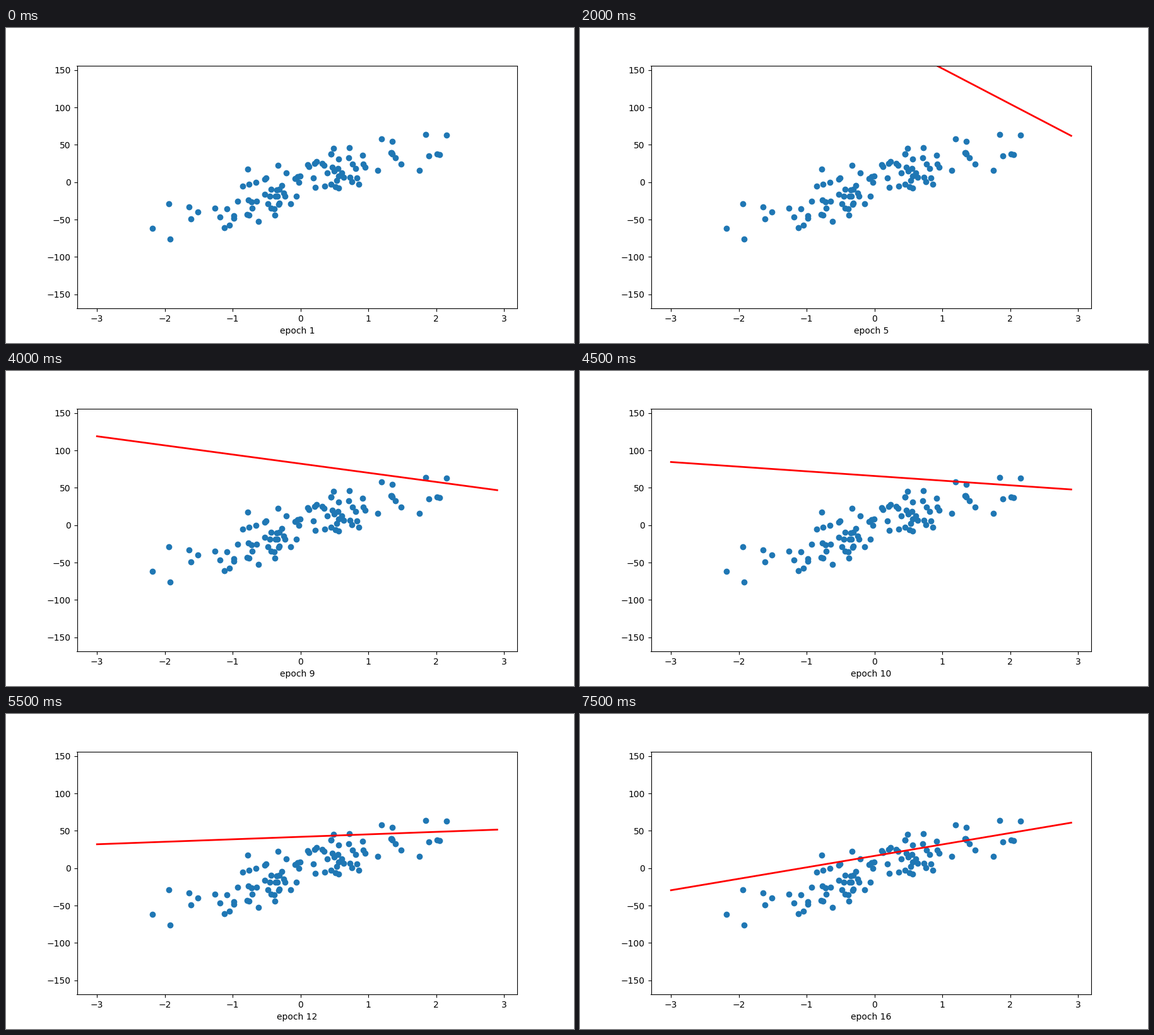
These frames come from a looping animation (900x500 px, 8000 ms). A matplotlib script:

```python
import numpy as np
import matplotlib.pyplot as plt
from matplotlib.animation import FuncAnimation

EPOCHS = 16
RATE = 0.001


def make_data(n=100, noise=20, seed=13):
    rng = np.random.RandomState(seed)
    x = rng.standard_normal(size=(n, 1))[:, 0]
    slope = 100 * rng.uniform()
    return x, slope * x + rng.normal(scale=noise, size=n)


def descend(x, y, m, b):
    """Return (m, b) after each epoch of batch gradient descent."""
    steps = []
    for _ in range(EPOCHS):
        err = y - m * x - b
        m, b = m + 2 * RATE * (err * x).sum(), b + 2 * RATE * err.sum()
        steps.append((m, b))
    return steps


x, y = make_data()
steps = descend(x, y, m=-127.82, b=600)

fig, ax = plt.subplots(figsize=(9, 5), dpi=100)
xs = np.arange(-3, 3, 0.1)
ax.scatter(x, y)
# The first line only sets the axis limits.
line, = ax.plot(xs, 50 * xs - 4, "r-", linewidth=2)
fig.canvas.draw()
ax.set_autoscale_on(False)


def update(i):
    m, b = steps[i]
    line.set_ydata(m * xs + b)
    ax.set_xlabel(f"epoch {i + 1}")
    return line,


anim = FuncAnimation(fig, update, frames=EPOCHS, interval=500, repeat=True,
                     repeat_delay=0)
plt.show()
```
